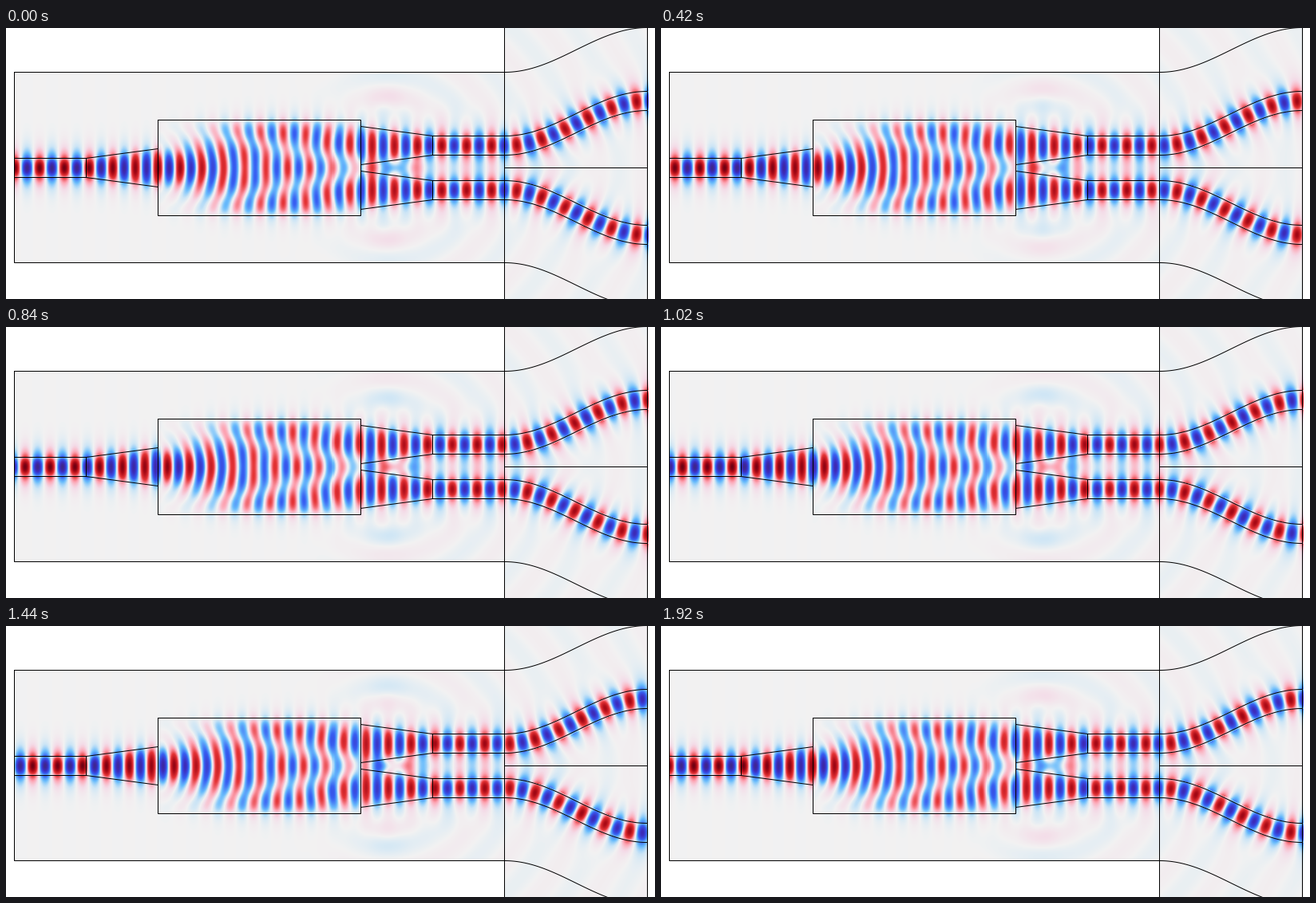
These frames come from a looping animation (813 px wide and 340 px high, 1980 ms). A matplotlib script:

```python
import numpy as np
import matplotlib.pyplot as plt
from matplotlib.animation import FuncAnimation
from matplotlib.colors import LinearSegmentedColormap

W, H, DPI = 813, 340, 100
FRAMES, INTERVAL = 33, 60

# Layout in pixel indices
LEFT, TAPER_IN, MMI_L, MMI_R, TAPER_OUT, BEND, RIGHT = 10, 100, 190, 444, 534, 624, 803
TOP, MID, BOTTOM = 55, 175, 294
ARM, RISE = 28, 56
CORE, WIDE, MMI_HALF = 12, 24, 60

K_CORE = 2 * np.pi / 26.55
K_CLAD = 2 * np.pi / 58

xs = np.arange(W, dtype=float)
X, Y = np.meshgrid(xs, np.arange(H, dtype=float))


def s_bend(x):
    s = np.clip((x - BEND) / (RIGHT - BEND), 0, 1)
    return RISE / 2 * (1 - np.cos(np.pi * s))


def guide(half, path, anchor, bend_scale=1.0):
    """Complex field of a single-mode guide following path, crest at anchor."""
    slope = np.gradient(path, xs)
    norm = np.hypot(1, slope)
    beta = np.sqrt(K_CORE**2 - (1.49 / half)**2) * norm
    beta = np.where(xs > BEND, beta * bend_scale, beta)
    phase = np.cumsum(beta)
    phase -= np.interp(anchor, xs, phase)

    off = Y - path
    dist = np.abs(off) / norm
    foot = X + off * slope / norm**2
    core = np.cos(1.3 * np.minimum(dist / half, 1))
    halo = 0.54 * CORE / half * np.exp(-0.11 * (dist - half))
    profile = np.where(dist < half, core, halo)
    return profile * (CORE / half)**0.2 * np.exp(1j * np.interp(foot, xs, phase))


def multimode():
    """Sum of the even modes launched by the input taper."""
    width, launch = 123.0, 25.7
    p = np.pi / (2 * launch)
    y = np.clip(Y - MID, -MMI_HALF, MMI_HALF)
    total = np.zeros_like(X, dtype=complex)
    for m in range(4):
        q = (2 * m + 1) * np.pi / width
        c = 4 * p / width * np.cos(q * launch) / (p**2 - q**2)
        beta = np.sqrt(K_CORE**2 - q**2)
        total += c * np.cos(q * y) * np.exp(1j * beta * (X - MMI_L))
    d = np.abs(Y - MID) - MMI_HALF
    return 0.88 * np.where(d > 0, 2.8 * np.exp(-0.12 * np.maximum(d, 0)), 1) * total


def stray():
    """Weak light radiated from the splitter and between the output tapers."""
    dy = np.abs(Y - MID)
    r = np.hypot(X - 475, dy)
    lobe = np.exp(-((X - 476) / 24)**2 - ((dy - 86) / 24)**2)
    ring = 0.032 * (100 / np.maximum(r, 100))**0.4 + 0.07 * lobe
    ring *= (1 - np.exp(-(r / 70)**4)) / (1 + np.exp(-(X - 420) / 18))
    ring = np.where((X < MMI_R) & (dy < MMI_HALF), 0, ring)
    gap = 0.4 * np.exp(-(dy / 9)**2 - ((X - 478) / 36)**2) * (X > MMI_R)
    return (ring * np.exp(1j * K_CLAD * (r - 90))
            - gap * np.exp(2j * np.pi * (X - 484.5) / 60))


def build_field():
    half_in = np.interp(xs, [TAPER_IN, MMI_L], [CORE, WIDE])
    half_out = np.interp(xs, [MMI_R, TAPER_OUT], [WIDE, CORE])
    source = guide(half_in, np.full(W, MID), 41.5)
    arms = sum(guide(half_out, MID + s * (ARM + s_bend(xs)), 544.4, 0.972)
               for s in (-1, 1))
    field = np.where(X < MMI_L, source,
                     np.where(X < MMI_R, multimode(), 0.82 * arms))
    return field + stray()


FIELD = build_field()
OUTSIDE = (X < LEFT) | (X > RIGHT) | ((X < BEND) & ((Y < TOP) | (Y > BOTTOM)))

STOPS = [
    (-1.0, (62, 38, 140)), (-0.8, (60, 45, 190)), (-0.5, (55, 95, 242)),
    (-0.25, (105, 188, 252)), (-0.1, (204, 229, 246)), (0.0, (242, 242, 242)),
    (0.1, (244, 220, 232)), (0.25, (253, 165, 180)), (0.5, (229, 52, 54)),
    (0.8, (170, 10, 22)), (1.0, (112, 0, 18)),
]
cmap = LinearSegmentedColormap.from_list(
    "wave", [((v + 1) / 2, tuple(c / 255 for c in rgb)) for v, rgb in STOPS], N=512)
cmap.set_bad("white")


def snapshot(i):
    wave = (FIELD * np.exp(-2j * np.pi * i / FRAMES)).real
    return np.ma.array(wave, mask=OUTSIDE)


fig = plt.figure(figsize=(W / DPI, H / DPI), dpi=DPI, facecolor="white")
ax = fig.add_axes([0, 0, 1, 1])
ax.axis("off")
image = ax.imshow(snapshot(0), cmap=cmap, vmin=-1, vmax=1,
                  interpolation="nearest", aspect="auto")
ax.set_xlim(-0.5, W - 0.5)
ax.set_ylim(H - 0.5, -0.5)


def line(x, y):
    ax.plot(x, y, color="black", lw=72 / DPI, snap=False,
            solid_capstyle="projecting", solid_joinstyle="miter")


def box(x0, x1, y0, y1):
    line([x0, x1, x1, x0, x0], [y0, y0, y1, y1, y0])


box(LEFT, BEND, TOP, BOTTOM)
box(MMI_L, MMI_R, MID - MMI_HALF, MID + MMI_HALF)
for x in (BEND, RIGHT):
    line([x, x], [-5, H + 5])
line([BEND, RIGHT], [MID, MID])
line([TAPER_IN, TAPER_IN], [MID - CORE, MID + CORE])

bend_x = np.linspace(BEND, RIGHT, 120)
for side, clad in ((-1, TOP), (1, BOTTOM)):
    line([LEFT, TAPER_IN, MMI_L],
         MID + side * np.array([CORE, CORE, WIDE]))
    line(bend_x, clad + side * s_bend(bend_x))
    arm = MID + side * ARM
    line([TAPER_OUT, TAPER_OUT], [arm - CORE, arm + CORE])
    for edge in (-1, 1):
        line([MMI_R, TAPER_OUT, BEND],
             arm + edge * np.array([WIDE, CORE, CORE]))
        line(bend_x, arm + edge * CORE + side * s_bend(bend_x))


def update(i):
    image.set_data(snapshot(i))
    return [image]


anim = FuncAnimation(fig, update, frames=FRAMES, interval=INTERVAL,
                     repeat=True, repeat_delay=0)
plt.show()
```
